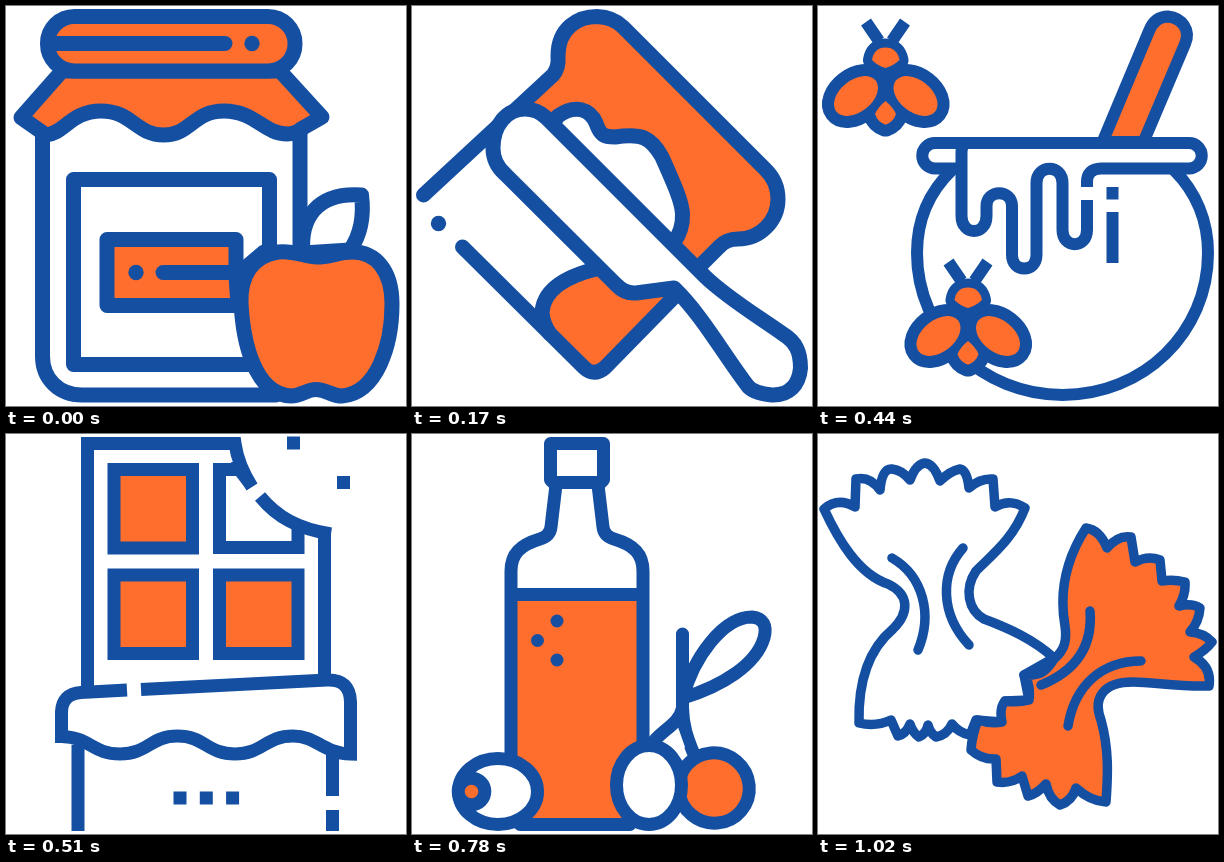
An HTML page for the animation above (1190 ms loop, 400 by 400 pixels).

```html
<!DOCTYPE html>
<html lang="en">
<head>
<meta charset="utf-8">
<title>Food icons</title>
<style>
html, body { margin: 0; height: 100%; overflow: hidden; background: #fff; }
svg { display: block; width: 100vw; height: 100vh; }
.icon {
  visibility: hidden;
  fill: none;
  stroke: #154fa2;
  stroke-linecap: round;
  stroke-linejoin: round;
  animation: show 1190ms step-end calc(var(--i) * 170ms - 1190ms) infinite;
}
.w15 { stroke-width: 15; }
.w13 { stroke-width: 13; }
.w12 { stroke-width: 12; }
.w9 { stroke-width: 9.5; }
.hard { stroke-linecap: butt; stroke-linejoin: miter; }
.butt { stroke-linecap: butt; }
.o { fill: #ff6e2c; }
.w { fill: #fff; }
.b { fill: #154fa2; }
.flat { stroke: none; }
.under { paint-order: stroke; }
@keyframes show {
  0% { visibility: visible; }
  14.2857%, 100% { visibility: hidden; }
}
</style>
</head>
<body>
<svg viewBox="0 0 400 400">
  <defs>
    <g id="bee">
      <path class="butt" d="M48 16L61 35M87 16L74 35"/>
      <ellipse class="b flat" cx="67.500" cy="78" rx="16" ry="17"/>
      <path class="o under" stroke-width="24" d="M67.500 95Q75 101 78 108Q75 116 67.500 118.500Q60 116 57 108Q60 101 67.500 95Z"/>
      <path class="o under" stroke-width="18" d="M54 54Q56 41.500 67.500 41.500Q79 41.500 81.500 54Q75 60 67.500 62Q60 60 54 54Z"/>
      <g class="o under" stroke-width="24">
        <ellipse cx="38" cy="90" rx="25" ry="16" transform="rotate(-38 38 90)"/>
        <ellipse cx="97.500" cy="90" rx="25" ry="16" transform="rotate(38 97.500 90)"/>
      </g>
      <path class="o flat" d="M67.500 95Q75 101 78 108Q75 116 67.500 118.500Q60 116 57 108Q60 101 67.500 95Z"/>
    </g>
  </defs>

  <!-- jam jar -->
  <g class="icon w15" style="--i:0">
    <path d="M36.500 128V350C36.500 373 53 389 76 389H270M294 125V245"/>
    <path class="o" d="M56 65L15 111.500L40 129C58 128 65 105 95 105C126 105 130 129 157.500 129C185 129 187 105 218 105C249 105 258 128 281 128Q289 128 295 123L316 111L274 65Z"/>
    <rect class="o" x="41.500" y="10.500" width="247.500" height="54.500" rx="27"/>
    <path d="M45 37.500H219"/>
    <circle class="b flat" cx="246" cy="37.500" r="7.700"/>
    <path d="M250 358.500H67.500V173.500H263.500V245"/>
    <path class="o" d="M230 270V233.500H101V299.500H232Z"/>
    <path d="M157 266.500H230M232 268L258 246"/>
    <circle class="b flat" cx="130" cy="266.500" r="7.700"/>
    <path class="w" d="M297 247C294 213 310 186 355.500 189C358 209 356 227 344 244Z"/>
    <path class="o" d="M311 251C299 251 288 244 272 246C246 250 234 270 235 297C237 335 248 388 285 390C296 390 300 383.500 310 383.500C321 383.500 325 390 336 390C371 387 386 339 386 298C386 265 370 246 347 246C333 246 324 251 311 251Z"/>
  </g>

  <!-- spread and knife -->
  <g class="icon w15" style="--i:1">
    <path class="o flat" d="M112 99L141 69Q147 62 146 50C146 22 166 10.500 185 10.500Q201 11 211 21L354 164Q366 176 366 193C366 215 348 233 326 233Q314 233 307 241L280 267Z"/>
    <path d="M11.500 189L141 69Q147 62 146 50C146 22 166 10.500 185 10.500Q201 11 211 21L354 164Q366 176 366 193C366 215 348 233 326 233Q314 233 307 241L288 260"/>
    <path class="w" d="M142 116L146 110C163 98 178 103 184 117C188 129 192 131 203 131C229 127 239 131 250 151C263 180 270 196 270.500 208Q271 224 262 236"/>
    <path class="o flat" d="M186 262.500C150 271 131 286 130 307L138 328L172 361.500Q182 371 193 361.500L262 291L262 282L200 270Z"/>
    <path d="M186 262.500C150 271 131 286 130 307Q131 318 138 328"/>
    <path d="M50.500 241L172 361.500Q182 371 193 361.500L262 291"/>
    <path class="w" d="M262 282L224 287Q213 288 204 278.500L93 168C85 161 81 152 81 142C81 119 95 103 113 103Q125 103 134 111.500L293 270.500C314 291 344 309 371 328C384 336 388.500 346 388.500 362C387 379 377 389.500 360 389Q340 387 335 379C312 349 290 309 262 282Z"/>
    <circle class="b flat" cx="26.500" cy="217.500" r="7.700"/>
  </g>

  <!-- honey pot -->
  <g class="icon w12" style="--i:2">
    <path class="butt" d="M134 164C111 186 99 215 99 247C99 327 165 389 244.500 389C325 389 390 327 390 247C390 215 378 186 356 164"/>
    <path class="o" d="M284.500 136L331 25C335 15 342 10.500 350 10.500C364 12 373 24 367 38L325.500 136Z"/>
    <path class="w flat" d="M105 137H383V162H105Z"/>
    <path class="butt" d="M144 162.500H117A12.700 12.700 0 0 1 117 137H371A12.700 12.700 0 0 1 371 162.500H283Q269 163 269 176V181"/>
    <path class="butt" d="M149 137Q143.500 138 143.500 147V210C143.500 230 168.500 230 168.500 210V200C168.500 183 194 183 194 200V249C194 267 218.500 267 218.500 249V177C218.500 158 244.500 158 244.500 177V224C244.500 243 269 243 269 224V194"/>
    <path class="butt" d="M294.500 181V193.500M294.500 206V257"/>
    <use href="#bee"/>
    <use href="#bee" x="82.500" y="240"/>
  </g>

  <!-- chocolate bar -->
  <g class="icon w13 hard" style="--i:3">
    <path d="M81.500 256V9.500H229Q232 31 246 53M254 62.500C271 83 292 95 325 100M318.500 96V246"/>
    <path d="M234 35.500H213.500V113.500H292V92"/>
    <path class="b flat" d="M225 28L235 28L249 49L240 55L230 42Z"/>
    <g class="o">
      <rect x="108" y="35.500" width="78.500" height="78.500"/>
      <rect x="108" y="141" width="78.500" height="78.500"/>
      <rect x="213.500" y="141" width="78.500" height="78.500"/>
    </g>
    <path class="w" d="M121 256L75 258.500Q56 260 55.500 278V302.500C84 303 86 320 114 320C142 320 144 302 171.500 302C199 302 201 320 229 320C257 320 259 302 287 302C311 302 316 319 344.500 320V268Q344 245 321 246L135 255.500"/>
    <path d="M72 311V397M326.500 320V362M326.500 376V397"/>
    <path stroke-dasharray="13 13.300" d="M167.500 364H234"/>
    <path d="M281 9H294M331 48.500H344"/>
  </g>

  <!-- oil bottle -->
  <g class="icon w13" style="--i:4">
    <path class="o flat" d="M99 160H231V390H99Z"/>
    <path d="M144 51L139 93Q138 102 128 105C108 111 99 120 99 137V330M186 51L191 93Q192 102 202 105C222 111 231 120 231 137V315M99 160.500H231M108 390.500H218"/>
    <path class="w" d="M138.500 9.500H191.500V46L189 48.500H141L138.500 46Z"/>
    <g class="b flat">
      <circle cx="145" cy="187" r="6.500"/>
      <circle cx="125.500" cy="206.500" r="6.500"/>
      <circle cx="145" cy="226" r="6.500"/>
    </g>
    <path d="M270.500 200V274C271 292 275 303 281 318M270.500 274C267 291 249 296 239 311"/>
    <path class="w" d="M271 264C281 224 311 183 340 183Q357 185 352 204C344 231 310 252 271 264Z"/>
    <ellipse class="o" cx="302" cy="354" rx="35.500" ry="35" transform="rotate(40 302 354)"/>
    <ellipse class="w" cx="237" cy="351" rx="32.500" ry="39.500"/>
    <path class="w flat" d="M252 308L267 296L273 313L267 320Q261 312 252 308Z"/>
    <ellipse class="w" cx="86" cy="357.500" rx="39.500" ry="33"/>
    <circle class="o" cx="59.500" cy="357.500" r="13.300"/>
  </g>

  <!-- olive branch -->
  <g class="icon w15" style="--i:5">
    <path d="M25 201C4 240 8 284 27 303C51 326 85 321 108 306C141 284 160 249 155 212C149 176 121 155 81 161"/>
    <path class="w flat" d="M119 116L112 154L140 168L149 125Z"/>
    <path class="w" d="M150 102C160 50 215 14 284.500 23C273 69 240 109 190 103C173 98 164 100 150 102Z"/>
    <path d="M158 99L217 64.500"/>
    <path class="w" d="M232 144C275 113 337 112 389.500 159C350 197 303 203 256 186"/>
    <path d="M238 159H303"/>
    <path d="M150 100C126 82 98 78 69 78C50 79 49 106 68 107Q98 108 119 116L112 156M140 171L149 124C188 136 217 172 233 212M188 108C226 137 252 168 267 211"/>
    <circle class="b flat" cx="49.500" cy="176" r="7.800"/>
    <ellipse class="b" cx="55" cy="288" rx="25" ry="18.500" transform="rotate(33 55 288)"/>
    <path class="b flat" d="M24 290L28 304Q50 323 78 317L84 300Z"/>
    <ellipse class="o flat" cx="55" cy="288" rx="17.500" ry="11" transform="rotate(33 55 288)"/>
    <ellipse class="o" cx="247" cy="296.500" rx="68.500" ry="82.500"/>
    <path class="b" d="M223 372V349C223 337 235 333 247 333C259 333 271 337 271 349V372L247 378Z"/>
    <ellipse class="w flat" cx="247" cy="351.500" rx="17.500" ry="10.500"/>
  </g>

  <!-- bow-tie pasta -->
  <g class="icon w9" style="--i:6">
    <path class="w" d="M6 75Q20 63 37 73L38 45Q52 42 62 56Q64 34 74 35Q84 36 92 46Q98 30 107 29Q116 30 122 47Q132 37 142 35Q149 36 151 54Q162 44 175 45L177 73Q192 64 207 74C195 105 175 120 158 137C146 155 150 176 166 185C190 194 215 205 236 224L206 241L211 266L187 267L183 288L158 286L152 301Q141 299 134 290Q129 301 118 303Q112 299 110 291Q108 300 101 303Q95 299 92 290Q88 300 80 302L73 286Q58 293 41 289C40 245 51 215 75 195C92 178 91 160 70 150C40 140 20 105 6 75Z"/>
    <path d="M74 124C105 142 115 180 100 216M145 114C122 140 122 180 151 211"/>
    <path class="o" d="M268 94Q282 96 289 114Q300 101 313 103L317 128Q330 121 342 126L344 147Q355 145 367 148Q368 160 361 172Q374 169 382 174Q381 188 372 198Q386 199 394 208Q388 216 376 223Q394 233 391 252C360 253 335 248 315 248C284 248 275 265 283 286C291 315 290 340 288 368Q272 367 258 354Q254 367 242 371Q231 365 228 350Q219 360 210 362L204 342Q193 350 179 348L178 325Q164 326 153 316Q154 301 160 286Q172 290 184 288Q181 274 187 267Q200 269 211 266Q213 250 206 241C222 242 228 238 236 225C247 216 249 206 247 192C241 158 248 125 268 94Z"/>
    <path d="M272 177C275 215 255 238 223 251M250 292C257 250 285 227 323 227"/>
  </g>
</svg>
</body>
</html>
```
